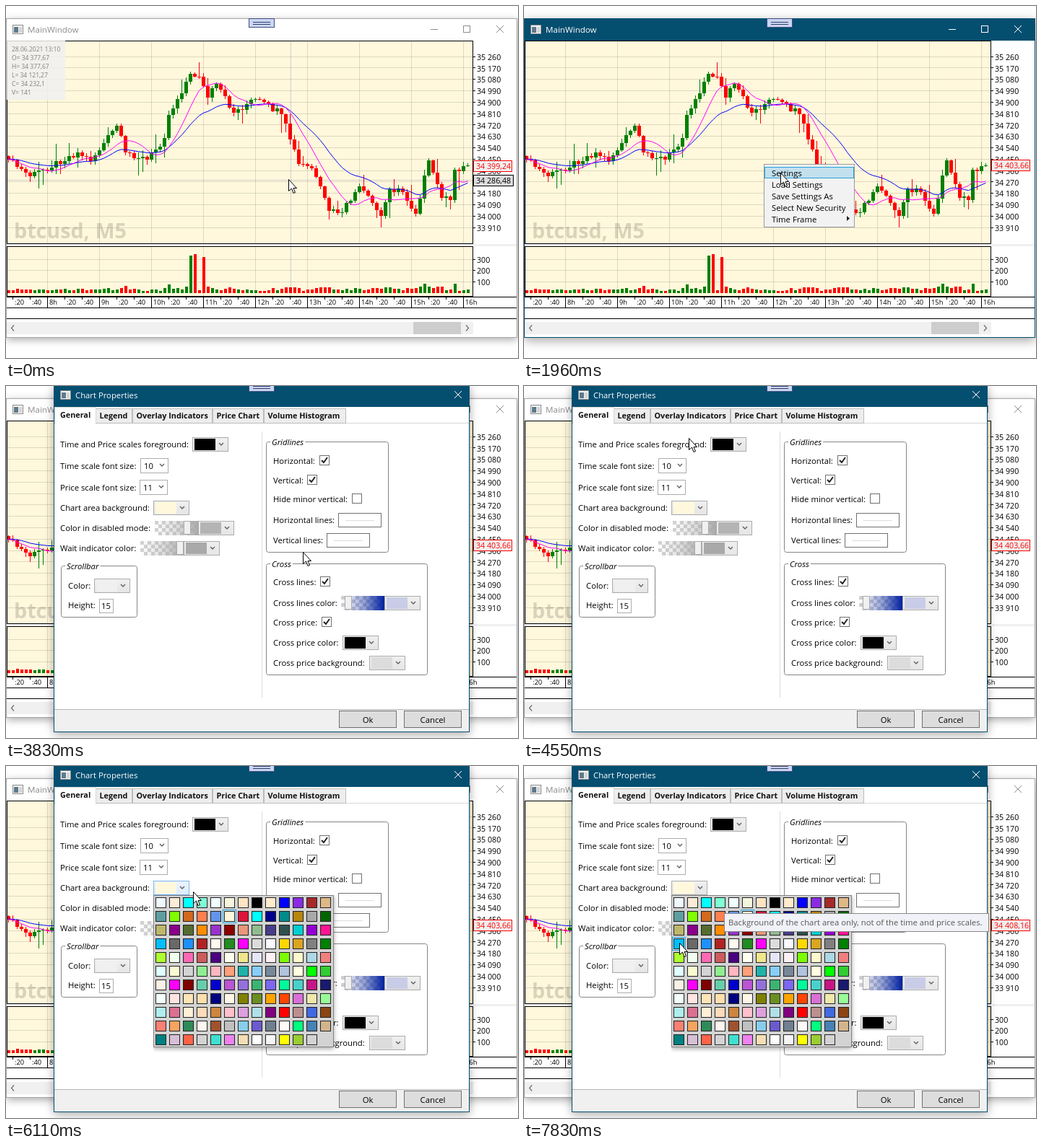
Recreate the animation shown at these times as an HTML page with a canvas. Size 709 by 488 pixels, loop 8000 ms.

```html
<!DOCTYPE html>
<html lang="en">
<head>
<meta charset="utf-8">
<title>Chart settings</title>
<style>
  html, body { margin: 0; width: 100%; height: 100%; overflow: hidden; background: #fff; }
  canvas { display: block; }
</style>
</head>
<body>
<canvas id="stage" width="709" height="488"></canvas>
<script>
const LOOP = 8000, ACCENT = '#044e70', PAPER = '#fff8dc';
const stage = document.getElementById('stage').getContext('2d');
let g = stage;

// ---- drawing helpers ----
const ramp = (t, a, b) => Math.min(1, Math.max(0, (t - a) / (b - a)));
const mix = (a, b, p) => a + (b - a) * p;
const random = n => { const v = Math.sin(n * 12.9898) * 43758.5453; return v - Math.floor(v); };

function text(s, x, cy, color = '#000', size = 11.3, style = '') {
  g.font = `${style} ${size}px "Open Sans", "Noto Sans", sans-serif`;
  g.fillStyle = color;
  g.fillText(s, x, cy + size * 0.36);
}
function rect(x, y, w, h, fill) {
  g.fillStyle = fill;
  g.fillRect(x, y, w, h);
}
function box(x, y, w, h, fill, border) {
  rect(x, y, w, h, fill);
  g.strokeStyle = border;
  g.lineWidth = 1;
  g.strokeRect(x + .5, y + .5, w - 1, h - 1);
}
function line(points, color, width = 1) {
  g.strokeStyle = color;
  g.lineWidth = width;
  g.beginPath();
  points.forEach(([x, y]) => g.lineTo(x, y));
  g.stroke();
}
function shadowed(blur, draw) {
  g.save();
  g.shadowColor = 'rgba(0,0,0,.35)';
  g.shadowBlur = blur;
  g.shadowOffsetY = blur / 4;
  draw();
  g.restore();
}
function faded(alpha, draw) {
  if (alpha <= 0) return;
  g.save();
  g.globalAlpha = alpha;
  draw();
  g.restore();
}
function closeMark(x, y, color) {
  line([[x - 5, y - 5], [x + 5, y + 5]], color);
  line([[x + 5, y - 5], [x - 5, y + 5]], color);
}
function appIcon(x, y) {
  box(x, y, 15, 13, '#f4f4f4', '#8a8a8a');
  rect(x + 2, y + 3, 6, 8, '#5d7a8c');
  rect(x + 9, y + 3, 4, 8, '#d4d4d4');
}
function adorner(y) {
  box(336, y, 36, 13, '#ccd5f0', '#3d4f80');
  rect(342, y + 5, 24, 1, '#2f3f70');
  rect(342, y + 8, 24, 1, '#2f3f70');
}

// ---- chart data: turning points [bar, screen height], joined with seeded noise ----
const BARS = 107;
const turns = [[0, 213], [5, 236], [16, 203], [19, 215], [25, 166], [27, 203], [32, 213], [36, 183], [37, 151],
  [42, 94], [44, 98], [46, 127], [48, 108], [52, 148], [57, 129], [63, 150], [67, 219], [70, 225], [74, 284],
  [77, 286], [81, 250], [86, 291], [88, 254], [91, 258], [94, 288], [97, 214], [100, 266], [102, 269], [103, 227], [106, 221]];

function closeAt(i) {
  const n = Math.max(1, turns.findIndex(([bar]) => bar >= i));
  const [a, b] = [turns[n - 1], turns[n]];
  const noise = turns.some(([bar]) => bar === i) ? 0 : 9 * (random(i + 1) - .5);
  return mix(a[1], b[1], ramp(i, a[0], b[0])) + noise;
}
const closes = Array.from({ length: BARS }, (_, i) => closeAt(i));
const burst = i => i > 41 && i < 46 && i !== 44;

let ema = 212;
const bars = closes.map((close, i) => {
  const open = i ? closes[i - 1] : 208;
  const recent = closes.slice(Math.max(0, i - 7), i + 1);
  const wick = seed => 1 + 5 * random(seed) + 22 * random(seed + .5) ** 8;
  ema += (close - ema) * 2 / 21;
  return {
    x: 3 + 6 * i, open, close,
    high: Math.min(open, close) - wick(i),
    low: Math.max(open, close) + wick(i + 200),
    volume: Math.round(burst(i) ? 55 - 6 * random(i) : 2 + 3 * random(i + 400) + Math.abs(close - open) / 4),
    fast: recent.reduce((a, b) => a + b) / recent.length,
    slow: ema,
  };
});

const STEP = 15.8, PX = STEP / 90;
const priceAt = y => 35260 - (y - 71) / PX;
const yOf = price => 71 + (35260 - price) * PX;
const group = s => s.replace('.', ',').replace(/^(\d\d)/, '$1 ');
const price2 = p => group(p.toFixed(2));
const priceShort = p => group(String(+p.toFixed(2)));

function legendLines(t, x) {
  if (t < 80) return ['28.06.2021 13:10', 'O= 34 377,67', 'H= 34 377,67', 'L= 34 121,27', 'C= 34 232,1', 'V= 141'];
  const i = Math.round((x - 3) / 6), b = bars[i], minutes = 435 + 5 * i;
  const pad = n => String(n).padStart(2, '0');
  return [`28.06.2021 ${pad(Math.floor(minutes / 60))}:${pad(minutes % 60)}`,
    ...['open', 'high', 'low', 'close'].map(k => `${k[0].toUpperCase()}= ${priceShort(priceAt(b[k]))}`),
    `V= ${Math.round(b.volume * 6.41)}`];
}

// ---- main window ----
function scaleMark(label, y) {
  const row = Math.floor(y) - 1;
  rect(2, row, 644, 1, 'rgba(0,0,0,.13)');
  rect(647, row, 3, 1, '#000');
  text(label, 652, y, '#000', 10.7);
}
function priceTag(price, width, fill, border, ink) {
  const y = Math.round(yOf(price));
  box(647, y - 8, width, 16, fill, border);
  text(price2(price), 651, y + .5, ink, 10.7);
}

function drawChart(t, cursor) {
  box(1, 48, 646, 282, PAPER, '#000');
  rect(1, 330, 706, 3, '#f0f0f0');
  box(1, 333, 646, 70, PAPER, '#000');
  [403, 418, 433].forEach(y => rect(1, y, 706, 1, '#000'));

  for (let i = 0; i < 16; i++) scaleMark(group(String(35260 - 90 * i)), 71 + STEP * i);
  for (let i = 0; i < 3; i++) scaleMark(String(300 - 100 * i), 352 + 15.6 * i);
  for (let x = 9, i = 1; x < 640; x += 24, i++) {
    const hour = i % 3 === 0;
    if (hour) {
      rect(x, 49, 1, 280, 'rgba(0,0,0,.13)');
      rect(x, 334, 1, 68, 'rgba(0,0,0,.13)');
    }
    rect(x, 404, 1, hour ? 14 : 3, '#000');
    text(hour ? 7 + i / 3 + 'h' : i % 3 === 1 ? ':20' : ':40', x + 3, 411, '#000', 9.3);
  }
  text('btcusd, M5', 11, 312, 'rgba(0,0,0,.15)', 28.7, 'bold');

  g.save();
  g.beginPath();
  g.rect(2, 49, 644, 353);
  g.clip();
  for (const b of bars) {
    const color = b.close > b.open ? '#f00' : '#008000';
    const top = Math.round(Math.min(b.open, b.close)), bottom = Math.round(Math.max(b.open, b.close));
    rect(b.x, Math.round(b.high), 1, Math.round(b.low - b.high), color);
    rect(b.x - 2, top, 5, Math.max(1, bottom - top), color);
    rect(b.x - 1, 398 - b.volume, 4, b.volume, color);
  }
  line(bars.map(b => [b.x + .5, b.slow]), '#0000ff');
  line(bars.map(b => [b.x + .5, b.fast]), '#ff00ff');
  g.restore();

  priceTag(t < 500 ? 34399.24 : t < 7000 ? 34403.66 : 34408.16, 54, '#f0f0f0', '#f00', '#f00');
  if (t < 780) {
    const x = Math.round(cursor.x) + 2, y = cursor.y + 1.907, tint = 'rgba(0,0,140,.17)';
    rect(x, 49, 1, 353, tint);
    rect(2, Math.round(y) - 1, 644, 1, tint);
    priceTag(priceAt(y), 56, '#dcdcdc', '#000', '#000');
    rect(1, 48, 81, 82, 'rgba(240,240,240,.85)');
    legendLines(t, x).forEach((s, i) => text(s, 8, 60 + 12 * i, '#808080', 8.5));
  }
}

function drawMain(t, cursor) {
  const active = t >= 780 && t < 3600;
  const ink = active ? '#fff' : '#8c8c8c';
  shadowed(active ? 14 : 11, () => rect(0, 17, 708, 443, '#fff'));
  box(0, 17, 708, 443, '#fff', active ? ACCENT : '#a6a6a6');
  if (active) rect(0, 17, 708, 31, ACCENT);
  appIcon(9, 26);
  text('MainWindow', 30, 33, ink, 11.6);
  rect(588, 32, 10, 1, ink);
  g.strokeStyle = ink;
  g.strokeRect(633.5, 27.5, 9, 9);
  closeMark(684, 32, ink);

  drawChart(t, cursor);

  rect(1, 438, 646, 17, '#f0f0f0');
  rect(564, 438, 66, 17, '#cdcdcd');
  line([[11, 442.5], [7.5, 446.5], [11, 450.5]], '#707070', 1.3);
  line([[637, 442.5], [640.5, 446.5], [637, 450.5]], '#707070', 1.3);
  adorner(17);
}

function drawMenu(cursor) {
  box(332, 219, 126, 88, '#f2f2f2', '#999');
  if (cursor.x > 332 && cursor.y > 222) box(333, 223, 124, 16, '#c3e0ee', '#26a0da');
  ['Settings', 'Load Settings', 'Save Settings As', 'Select New Security', 'Time Frame']
    .forEach((s, i) => text(s, 343, 232 + 16 * i));
  g.fillStyle = '#222';
  g.beginPath();
  g.moveTo(447, 291);
  g.lineTo(451, 294.5);
  g.lineTo(447, 298);
  g.fill();
}

// ---- properties dialog: each control takes its left edge and middle height ----
const chevron = (x, y) => line([[x - 3, y - 2], [x, y + 1], [x + 3, y - 2]], '#606060', 1.4);

function colorCombo(x, y, color, hot = false) {
  const shade = g.createLinearGradient(0, y - 10, 0, y + 10);
  shade.addColorStop(0, hot ? '#ecf4fc' : '#f0f0f0');
  shade.addColorStop(1, hot ? '#dcecfc' : '#e5e5e5');
  box(x, y - 10, 50, 20, shade, hot ? '#7eb4ea' : '#acacac');
  rect(x + 3, y - 8, 29, 16, color);
  chevron(x + 40, y);
}
function numberCombo(x, y, value) {
  box(x, y - 11, 39, 21, '#fff', '#acacac');
  text(value, x + 5, y);
  chevron(x + 30, y - 1);
}
function numberBox(x, y, value) {
  box(x, y - 9, 20, 20, '#fff', '#abadb3');
  text(value, x + 3, y + 1);
}
function alphaCombo(x, y, color, value, thumb) {
  for (let i = 0; i < 48; i++) {
    const col = i % 12, row = Math.floor(i / 12);
    rect(x + col * 5, y - 10 + row * 5, 5, 5, (col + row) % 2 ? '#fff' : '#d3d3d3');
  }
  const fade = g.createLinearGradient(x, 0, x + 60, 0);
  ['00', '60', 'ff'].forEach((alpha, i) => fade.addColorStop(i / 2, color + alpha));
  rect(x, y - 10, 60, 20, fade);
  box(x + thumb, y - 10, 10, 19, '#f0f0f0', '#acacac');
  colorCombo(x + 60, y, value);
}
function checkbox(x, y, checked) {
  box(x, y - 8, 14, 14, '#fff', '#707070');
  if (checked) line([[x + 3, y - 1], [x + 6, y + 2], [x + 11, y - 5]], '#212121', 2);
}
function lineSample(x, y) {
  box(x, y - 10, 60, 20, '#fff', '#707070');
  rect(x + 10, y, 40, 1, '#dcdcdc');
}
function field(label, x, y, control, controlX, ...options) {
  text(label, x, y);
  control(controlX, y, ...options);
}
function groupBox(title, x, y, w, h) {
  g.strokeStyle = '#858585';
  g.lineWidth = 1;
  g.beginPath();
  g.roundRect(x + .5, y + .5, w - 1, h - 1, 3);
  g.stroke();
  g.font = 'italic 11.3px "Open Sans", "Noto Sans", sans-serif';
  rect(x + 6, y - 2, g.measureText(title).width + 4, 5, '#fff');
  text(title, x + 8, y + 1, '#000', 11.3, 'italic');
}
function button(label, x) {
  box(x, 450, 80, 24, '#ddd', '#707070');
  g.textAlign = 'center';
  text(label, x + 40, 463);
  g.textAlign = 'left';
}

function drawDialogFrame() {
  shadowed(12, () => rect(66, -3, 576, 483, ACCENT));
  rect(67, 29, 574, 450, '#fff');
  appIcon(75, 6);
  text('Chart Properties', 96, 13, '#fff');
  closeMark(626, 12, '#fff');
}

function drawDialogContent() {
  rect(67, 51, 574, 1, '#d9d9d9');
  [['Legend', 124, 175], ['Overlay Indicators', 175, 286], ['Price Chart', 286, 357], ['Volume Histogram', 357, 471]]
    .forEach(([label, left, right]) => {
      box(left, 31, right - left, 21, '#ededed', '#bcbcbc');
      text(label, left + 5.5, 41, '#111', 10.8, 'bold');
    });
  box(67, 29, 58, 24, '#fff', '#d9d9d9');
  rect(68, 51, 56, 3, '#fff');
  text('General', 75, 40, '#111', 10.8, 'bold');
  rect(354, 63, 1, 369, '#d5dfe5');

  field('Time and Price scales foreground:', 75, 81, colorCombo, 258, '#000');
  field('Time scale font size:', 75, 111, numberCombo, 186, '10');
  field('Price scale font size:', 75, 141, numberCombo, 185, '11');
  field('Chart area background:', 75, 169, colorCombo, 204, PAPER);
  field('Color in disabled mode:', 75, 197, alphaCombo, 206, '#a9a9a9', '#b4b4b4', 40);
  field('Wait indicator color:', 75, 225, alphaCombo, 186, '#a9a9a9', '#a9a9a9', 50);

  groupBox('Scrollbar', 76, 249, 106, 72);
  field('Color:', 86, 277, colorCombo, 122, '#f0f0f0');
  field('Height:', 86, 304, numberBox, 129, '15');

  groupBox('Gridlines', 360, 77, 170, 154);
  field('Horizontal:', 370, 104, checkbox, 434, true);
  field('Vertical:', 370, 131, checkbox, 417, true);
  field('Hide minor vertical:', 370, 157, checkbox, 479, false);
  field('Horizontal lines:', 370, 186, lineSample, 460);
  field('Vertical lines:', 370, 214, lineSample, 444);

  groupBox('Cross', 360, 246, 224, 155);
  field('Cross lines:', 370, 272, checkbox, 435, true);
  field('Cross lines color:', 370, 301, alphaCombo, 464, '#00209f', '#c9cce6', 5);
  field('Cross price:', 370, 328, checkbox, 437, true);
  field('Cross price color:', 370, 356, colorCombo, 466, '#000');
  field('Cross price background:', 370, 384, colorCombo, 503, '#dcdcdc');

  rect(67, 448, 574, 31, '#f0f0f0');
  rect(67, 448, 574, 1, '#b8b8b8');
  button('Ok', 461);
  button('Cancel', 551);
  adorner(-5);
}

// Layers are painted once so that the dialog can fade and scale as a whole.
const PAD = 10;
function paintLayer(...parts) {
  const layer = document.createElement('canvas');
  layer.width = 709;
  layer.height = 488 + 2 * PAD;
  g = layer.getContext('2d');
  g.translate(0, PAD);
  parts.forEach(draw => draw());
  g = stage;
  return layer;
}
const emptyDialog = paintLayer(drawDialogFrame);
const dialog = paintLayer(drawDialogFrame, drawDialogContent);

// ---- colour popup and tooltip ----
const swatches = `AliceBlue AntiqueWhite Aqua Aquamarine Azure Beige Bisque Black BlanchedAlmond Blue BlueViolet Brown BurlyWood
CadetBlue Chartreuse Chocolate Coral CornflowerBlue Cornsilk Crimson Cyan DarkBlue DarkCyan DarkGoldenrod DarkGray DarkGreen
DarkKhaki DarkMagenta DarkOliveGreen DarkOrange DarkOrchid DarkRed DarkSalmon DarkSeaGreen DarkSlateBlue DarkSlateGray DarkTurquoise DarkViolet DeepPink
DeepSkyBlue DimGray DodgerBlue Firebrick FloralWhite ForestGreen Fuchsia Gainsboro GhostWhite Gold Goldenrod Gray Green
GreenYellow Honeydew HotPink IndianRed Indigo Ivory Khaki Lavender LavenderBlush LawnGreen LemonChiffon LightBlue LightCoral
LightCyan LightGoldenrodYellow LightGray LightGreen LightPink LightSalmon LightSeaGreen LightSkyBlue LightSlateGray LightSteelBlue LightYellow Lime LimeGreen
Linen Magenta Maroon MediumAquamarine MediumBlue MediumOrchid MediumPurple MediumSeaGreen MediumSlateBlue MediumSpringGreen MediumTurquoise MediumVioletRed MidnightBlue
MintCream MistyRose Moccasin NavajoWhite Navy OldLace Olive OliveDrab Orange OrangeRed Orchid PaleGoldenrod PaleGreen
PaleTurquoise PaleVioletRed PapayaWhip PeachPuff Peru Pink Plum PowderBlue Purple Red RosyBrown RoyalBlue SaddleBrown
Salmon SandyBrown SeaGreen SeaShell Sienna Silver SkyBlue SlateBlue SlateGray Snow SpringGreen SteelBlue Tan
Teal Thistle Tomato Transparent Turquoise Violet Wheat White WhiteSmoke Yellow YellowGreen Transparent`.split(/\s+/);

function drawPalette(open, cursor) {
  const height = 211 * open;
  g.save();
  g.beginPath();
  g.rect(204, 179, 258, height + 7);
  g.clip();
  shadowed(6, () => rect(204, 179, 250, height, '#d3d3d3'));
  g.beginPath();
  g.rect(204, 179, 250, height);
  g.clip();
  g.translate(0, height - 211);
  box(204, 179, 250, 211, '#d3d3d3', '#838383');
  swatches.forEach((color, i) => {
    const x = 205 + 19 * (i % 13), y = 180 + 19 * Math.floor(i / 13);
    const over = cursor.x >= x && cursor.x < x + 19 && cursor.y >= y && cursor.y < y + 19;
    if (over || color === 'Cornsilk') box(x, y, 19, 19, '#cbe8f6', '#26a0da');
    box(x + 2, y + 2, 15, 15, color, '#222');
  });
  g.restore();
}

function drawTooltip(x, y, alpha) {
  faded(alpha, () => {
    box(x, y, 367, 26, '#f1f2f7', '#8a8a8a');
    text('Background of the chart area only, not of the time and price scales.', x + 6, y + 13, '#575757');
  });
}

// ---- pointer: moves as [start, end, x, y], resting in between ----
const moves = [[80, 610, 331, 218], [1570, 1960, 356, 231], [2270, 2520, 404, 231], [2750, 2820, 412, 230],
  [3980, 4400, 262, 66], [4400, 4780, 180, 80], [4860, 5170, 246, 171], [6040, 6110, 260, 174],
  [6190, 6640, 332, 262], [6820, 7600, 216, 266], [7750, 7830, 216, 245]];

function pointerAt(t) {
  return moves.reduce((at, [start, end, x, y]) => {
    const p = ramp(t, start, end);
    return { x: mix(at.x, x, p), y: mix(at.y, y, p) };
  }, { x: 392, y: 240 });
}
function drawPointer({ x, y }, clicked) {
  g.save();
  g.translate(Math.round(x) - .5, Math.round(y) + .5);
  if (clicked) {
    g.fillStyle = 'rgba(255,255,0,.47)';
    g.beginPath();
    g.arc(0, 0, 12, 0, 7);
    g.fill();
  }
  g.beginPath();
  [[0, 0], [0, 16], [4, 12.5], [6.5, 19], [9, 18], [6.5, 12], [11, 12]].forEach(p => g.lineTo(...p));
  g.closePath();
  g.fillStyle = '#fff';
  g.fill();
  g.strokeStyle = '#000';
  g.lineWidth = 1;
  g.stroke();
  g.restore();
}

// ---- timeline ----
function render(t) {
  const cursor = pointerAt(t);
  const during = (a, b) => t >= a && t < b;
  rect(0, 0, 709, 488, '#fff');
  drawMain(t, cursor);

  if (t >= 3600) {
    const opening = t < 3670, shown = opening ? 0 : ramp(t, 3600, 3830);
    faded(mix(.14, 1, shown), () => {
      const scale = mix(.958, 1, shown);
      g.translate(353.5, 237);
      g.scale(scale, scale);
      g.drawImage(opening ? emptyDialog : dialog, -353.5, -237 - PAD);
    });
  }
  if (during(800, 3700)) faded(ramp(t, 800, 1100), () => drawMenu(cursor));

  if (during(5080, 6190)) colorCombo(204, 169, PAPER, true);
  if (during(5100, 5560)) drawTooltip(228, 181, t < 5240 ? ramp(t, 5100, 5170) / 2 : 1);
  if (t >= 5560) drawPalette(ramp(t, 5500, 5790), cursor);
  drawTooltip(277, 204, ramp(t, 6400, 6640));

  drawPointer(cursor, during(780, 930) || during(3290, 3440) || during(5390, 5560));
}

function frame() {
  render(performance.now() % LOOP);
  requestAnimationFrame(frame);
}
frame();
</script>
</body>
</html>
```
